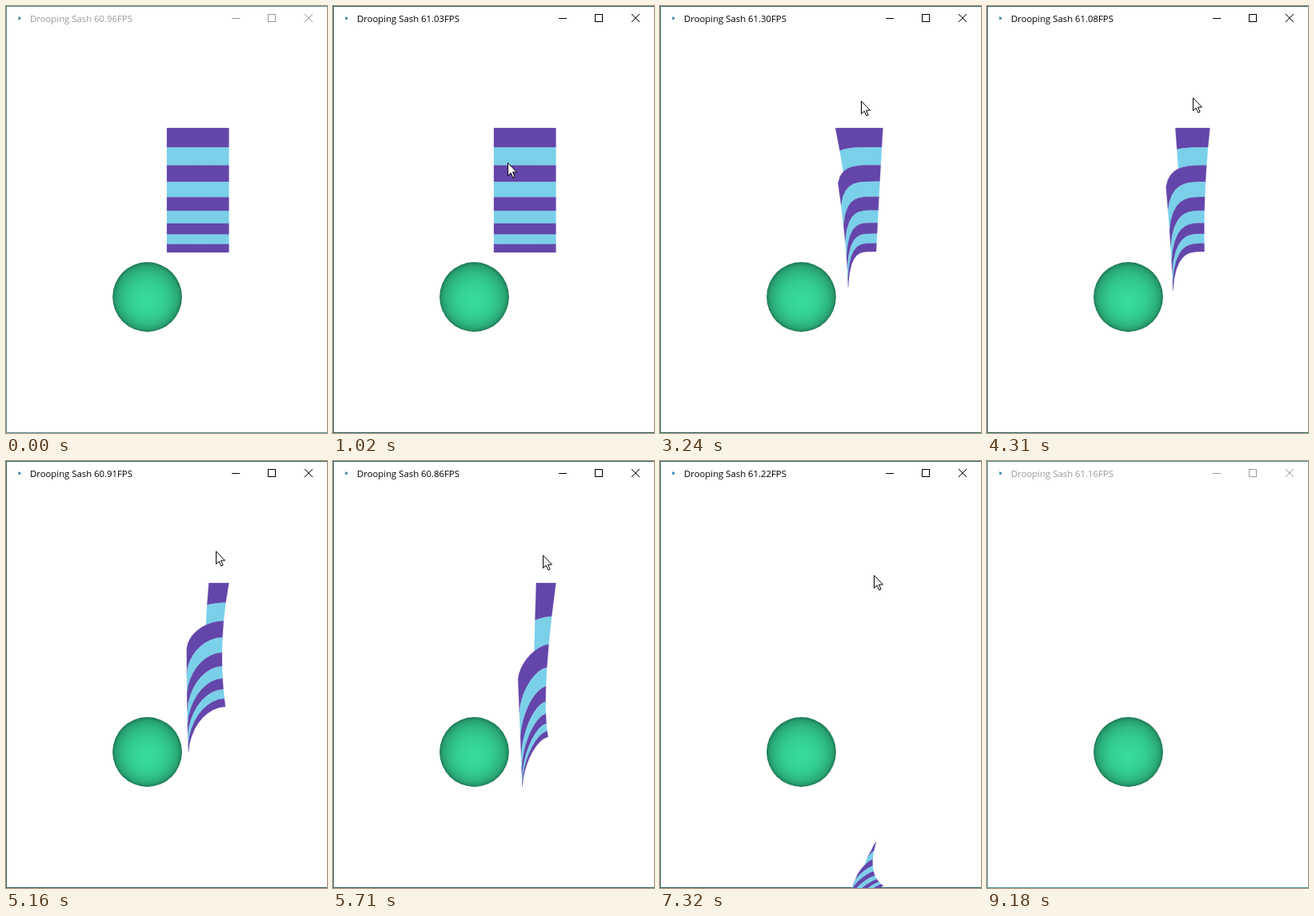
Recreate the animation shown at these times as an HTML page with a canvas. Size 401x532 px, loop 9250 ms.

```html
<!DOCTYPE html>
<html lang="en">
<head>
<meta charset="utf-8">
<title>Drooping Sash</title>
<style>
  html, body { margin: 0; width: 100%; height: 100%; overflow: hidden; background: #fff; }
  canvas { position: absolute; left: 0; top: 0; }
  #title {
    position: absolute; left: 30px; top: 8px; white-space: pre;
    font: 11.33px/16px "Open Sans", "Noto Sans", sans-serif;
  }
</style>
</head>
<body>
<canvas id="stage" width="401" height="532"></canvas>
<div id="title"></div>
<script>
const LOOP = 9250;
const ROWS = 9, COLS = 9;
const ctx = document.getElementById('stage').getContext('2d');
const title = document.getElementById('title');

const clamp = p => Math.min(1, Math.max(0, p));
const mix = (a, b, p) => a + (b - a) * p;
const smooth = p => p * p * (3 - 2 * p);
const easeOut = p => 1 - (1 - p) ** 2.5;
const span = (t, from, to) => clamp((t - from) / (to - from));
const range = (from, to) => Array.from({ length: to - from + 1 }, (_, i) => from + i);

// Stripes get shorter downwards; rowAt is a boundary's share of the full height.
const drop = row => 25 * row - 0.865 * row * row;
const rowAt = row => drop(row) / drop(ROWS);

// A pose is the top, middle and bottom of both side edges;
// bend shapes the rows that run between them, along x and y.
const rest = {
  left: [[201, 152], [201, 229.5], [201, 307]],
  right: [[278.4, 152], [278.4, 229.5], [278.4, 307]], bend: [1, 1] };
const folded = {
  left: [[211, 152], [228, 262], [235, 350]],
  right: [[278.4, 152], [274, 229], [270, 306]], bend: [1.4, 4] };
const torn = {
  left: [[226, 152], [226, 279], [228, 362]],
  right: [[278.4, 152], [270, 230], [274, 306]], bend: [1.6, 1.75] };
const loose = {
  left: [[256, 335], [243, 395], [247, 460]],
  right: [[268, 251], [262, 320], [262, 390]], bend: [1.5, 1.2] };
const landing = {
  left: [[258, 510], [240, 533], [250, 560]],
  right: [[270, 474], [266, 508], [279, 529]], bend: [1.5, 1.2] };

const mixPoint = (a, b, p) => a.map((v, i) => mix(v, b[i], p));
const mixEdge = (a, b, p, top) => a.map((pt, i) => mixPoint(pt, b[i], i ? p : top));

function mixPose(a, b, p, top = p) {
  return {
    left: mixEdge(a.left, b.left, p, top),
    right: mixEdge(a.right, b.right, p, top),
    bend: mixPoint(a.bend, b.bend, p)
  };
}

function poseAt(t) {
  if (t < 3700) return mixPose(rest, folded, easeOut(span(t, 1980, 3240)));
  if (t < 5160) return mixPose(folded, torn, smooth(span(t, 3700, 5160)));
  // The top corners stay pinned until the last cut.
  if (t < 6390) return mixPose(torn, loose, span(t, 5160, 6390), span(t, 5850, 6390) ** 2);
  const p = (t - 6390) / 930;
  return mixPose(loose, landing, (p + p * p) / 2);
}

// Quadratic through three points at v = 0, 0.5 and 1.
function edgePoint([a, b, c], v) {
  return a.map((_, i) =>
    a[i] * (1 - v) * (1 - 2 * v) + b[i] * 4 * v * (1 - v) + c[i] * v * (2 * v - 1));
}

function clothPoint(pose, row, col) {
  const v = rowAt(row), u = col / COLS;
  const [lx, ly] = edgePoint(pose.left, v), [rx, ry] = edgePoint(pose.right, v);
  return [mix(lx, rx, u ** pose.bend[0]), mix(ry, ly, (1 - u) ** pose.bend[1])];
}

function polygon(points) {
  ctx.beginPath();
  points.forEach(([x, y]) => ctx.lineTo(x, y));
  ctx.closePath();
}

function circle(x, y, r) {
  ctx.beginPath();
  ctx.arc(x, y, r, 0, Math.PI * 2);
  ctx.fill();
}

function drawCloth(t) {
  if (t > 8000) return;
  const pose = poseAt(t);
  const cut = 2 * [1900, 3700, 4400].filter(at => t >= at).length;
  ctx.lineWidth = 0.3;
  for (let row = 0; row < ROWS; row++) {
    const cols = range(row < 2 ? cut : 0, COLS);
    ctx.fillStyle = ctx.strokeStyle = row % 2 ? '#7bd0e9' : '#6446aa';
    polygon([
      ...cols.map(col => clothPoint(pose, row, col)),
      ...cols.reverse().map(col => clothPoint(pose, row + 1, col))]);
    ctx.fill();
    ctx.stroke();
  }
}

function drawBall() {
  const shade = ctx.createRadialGradient(176, 369, 0, 176.5, 362.5, 43.5);
  for (const i of range(0, 12)) {
    const r = i / 12;
    const light = 0.54 + 0.46 * Math.sqrt(1 - r * r);
    shade.addColorStop(r, `rgb(${[54, 218, 154].map(c => Math.round(c * light))})`);
  }
  ctx.fillStyle = shade;
  circle(176.5, 362.5, 43.4);
}

function drawWindow(active) {
  ctx.fillStyle = '#fff';
  ctx.fillRect(0, 0, 401, 532);
  ctx.fillStyle = active ? '#2f6163' : '#559496';
  ctx.fillRect(0, 0, 401, 1);
  ctx.fillRect(0, 0, 1, 532);
  ctx.fillRect(0, 531, 401, 1);
  ctx.fillStyle = '#2474a4';
  polygon([[15.5, 13], [19, 15.2], [15.5, 17.4]]);
  ctx.fill();
  ctx.strokeStyle = active ? '#000' : '#999';
  ctx.lineWidth = 1;
  ctx.strokeRect(327.5, 10.5, 9, 9);
  ctx.beginPath();
  ctx.moveTo(282, 15.5); ctx.lineTo(292, 15.5);
  ctx.moveTo(373, 10); ctx.lineTo(383, 20);
  ctx.moveTo(383, 10); ctx.lineTo(373, 20);
  ctx.stroke();
}

// Time, x and y of the points the cursor passes.
const cursorPath = [
  [450, 140, 532], [950, 218, 198], [1600, 205, 113], [2250, 205, 113],
  [3240, 251, 118], [5160, 262, 112], [6390, 263, 124], [7750, 268, 148], [8550, 358, 533]];

function drawCursor(t) {
  const next = cursorPath.findIndex(([at]) => at > t);
  if (next < 1) return;
  const [from, ...a] = cursorPath[next - 1], [to, ...b] = cursorPath[next];
  const [x, y] = mixPoint(a, b, smooth(span(t, from, to))).map(Math.round);
  if (t >= 1800 && t < 2250) {
    ctx.fillStyle = '#fffb80';
    circle(x, y, 12);
  }
  ctx.save();
  ctx.translate(x + 0.5, y + 0.5);
  polygon([[0, 0], [0, 16], [3.7, 12.5], [6.3, 18.3], [8.6, 17.3], [6, 11.5], [11, 11.5]]);
  ctx.fillStyle = '#fff';
  ctx.strokeStyle = '#000';
  ctx.lineWidth = 1;
  ctx.fill();
  ctx.stroke();
  ctx.restore();
}

// Frame rate readings, evenly spread over the loop.
const rates = [60.96, 61.03, 61.10, 61.30, 61.08, 60.91, 60.86, 61.22, 61.05, 61.16];

function render(t) {
  const active = t >= 700 && t < 8700;
  const rate = rates[Math.floor(t / LOOP * rates.length)];
  title.textContent = `Drooping Sash ${rate.toFixed(2)}FPS`;
  title.style.color = active ? '#000' : '#999';
  drawWindow(active);
  drawCloth(t);
  drawBall();
  drawCursor(t);
}

const start = performance.now();
function tick() {
  render((performance.now() - start) % LOOP);
  requestAnimationFrame(tick);
}
tick();
</script>
</body>
</html>
```
